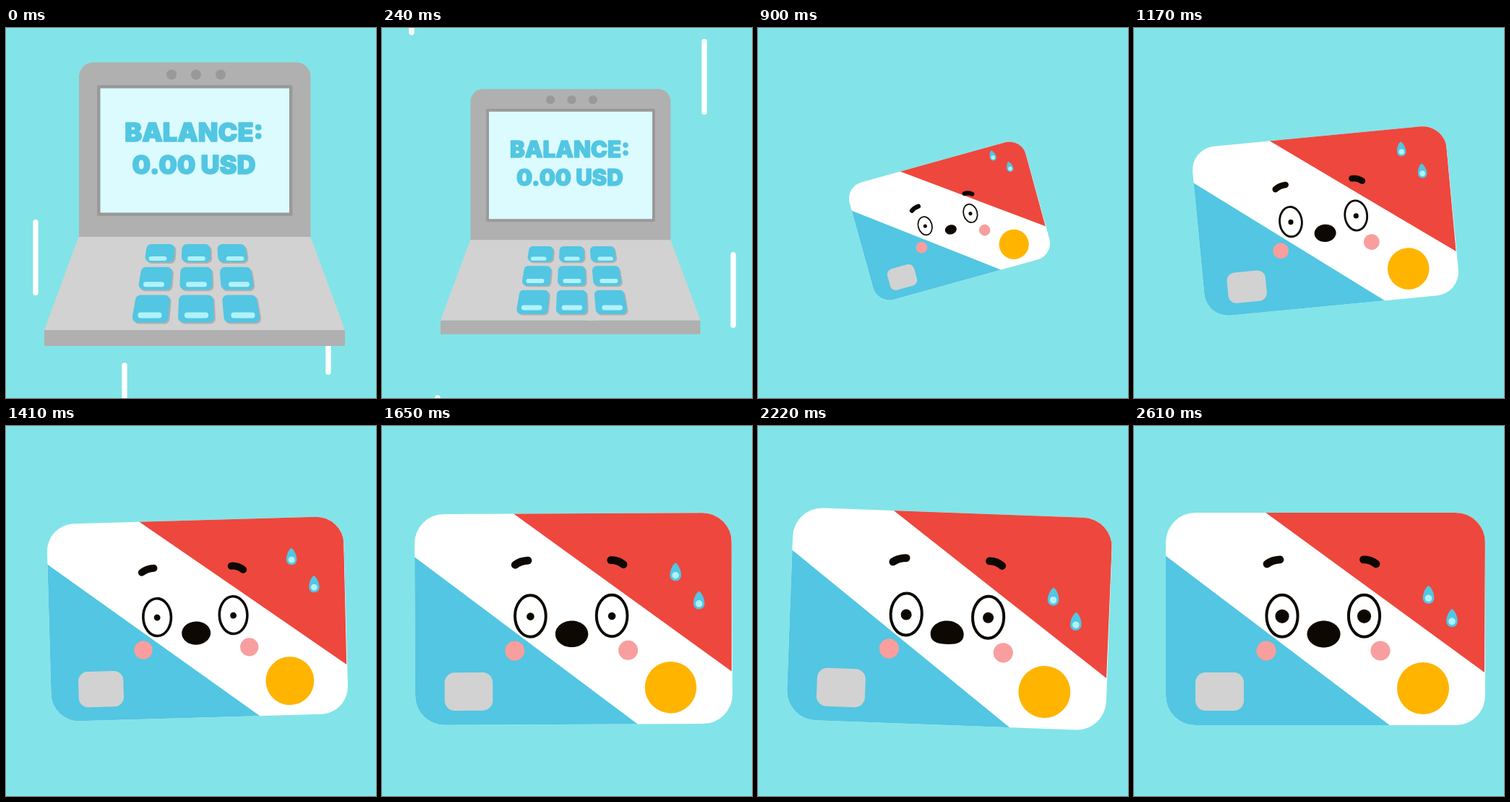
An HTML page with a canvas for the animation above (2640 ms loop, 512x512 px).

```html
<!DOCTYPE html>
<html lang="en">
<head>
<meta charset="utf-8">
<title>Empty balance</title>
<style>
  html, body { margin: 0; width: 100%; height: 100%; overflow: hidden; background: #82e4e8; }
  canvas { display: block; width: 512px; height: 512px; }
</style>
</head>
<body>
<canvas id="stage" width="512" height="512"></canvas>
<script>
const ctx = document.getElementById('stage').getContext('2d');
const LOOP = 2640, STEP = 30, SWAP = 780;
const SKY = '#82e4e8', BLUE = '#52c6e2', PALE = '#b0f2fc', RED = '#ee473e';
const GREY = '#b0b0b0', LIGHT = '#d2d2d2', DARK = '#999', INK = '#0d0802';

// Motion: every rule depends on the loop time in ms.
const laptopScale = t => 1 - 0.2715 * t / 480;
const distance = t => Math.pow(Math.max(0, 1760 - t) * 0.00076, 2);
const sway = t => t < 1770 || t > 2610 ? 0 : Math.sin(Math.PI * (t - 1770) / 840) ** 2;
const tilt = t => 2.15 * sway(t) - Math.pow(Math.max(0, 2081 - t) * 0.00168, 4);
const pupil = t => 4.5 + 5.1 * Math.pow(Math.max(0, t - 1170) / 1440, 1.65);
const slide = t => 1 - Math.exp(-Math.pow(Math.max(0, t - 792) * 0.0012, 2.3));

function fill(color) { ctx.fillStyle = color; ctx.fill(); }

function box(x, y, w, h, r, color) {
  ctx.beginPath();
  ctx.roundRect(x, y, w, h, r);
  fill(color);
}

function ellipse(x, y, rx, ry, color) {
  ctx.beginPath();
  ctx.ellipse(x, y, rx, ry, 0, 0, 7);
  fill(color);
}

const circle = (x, y, r, color) => ellipse(x, y, r, r, color);

function poly(points, color, r = 0) {
  const n = points.length, last = points[n - 1], first = points[0];
  ctx.beginPath();
  ctx.moveTo((last[0] + first[0]) / 2, (last[1] + first[1]) / 2);
  points.forEach((p, i) => ctx.arcTo(...p, ...points[(i + 1) % n], r));
  ctx.closePath();
  fill(color);
}

// x and starting top edge
const streaks = [
  [41, 265], [446, 375], [164, 463], [290, 670], [486, 670],
  [77, 868], [465, 1042], [77, 1143], [154, 1214]
];

function drawStreaks(t) {
  const span = 1320, length = 105;
  for (const [x, top] of streaks) {
    const y = (top - 1.5 * t + length + span) % span - length;
    box(x - 3.7, y, 7.4, length, 3.7, '#fff');
  }
}

// Keys widen and spread towards the viewer, row by row.
function drawKey(row, col) {
  const top = 299 + 28.25 * row + 3.5 * row * row;
  const bottom = top + 25 + 6.5 * row;
  const topX = 263 + col * (48.3 + 5.5 * row), topHalf = 19.4 + 2.1 * row;
  const bottomX = 263 + col * (51.3 + 6.5 * row), bottomHalf = 20.4 + 2.4 * row;
  const face = d => [
    [topX - topHalf + d, top + d], [topX + topHalf + d, top + d],
    [bottomX + bottomHalf + d, bottom + d], [bottomX - bottomHalf + d, bottom + d]
  ];
  poly(face(2), GREY, 7);
  poly(face(0), BLUE, 7);
  const w = 24.8 + 4.2 * row, h = 6 + row;
  const x = 263.5 + col * (53.5 + 5.5 * row);
  box(x - w / 2, bottom - 2 - 2 * row - h, w, h, 4, PALE);
}

function label(text, y) {
  ctx.strokeText(text, 260, y);
  ctx.fillText(text, 260, y);
}

function drawLaptop(t) {
  const s = laptopScale(t);
  ctx.save();
  ctx.translate(259.3, 320.3);
  ctx.scale(s, s);
  ctx.translate(-259.3, -320.3);
  box(101, 47.5, 320.5, 243.5, [20, 20, 0, 0], GREY);
  for (let i = -1; i <= 1; i++) circle(263 + 34 * i, 64.5, 7, DARK);
  box(126, 79, 270.5, 181, 2, DARK);
  box(130.5, 83.5, 261.5, 172, 0, '#dbfbff');
  poly([[100.5, 289], [421.5, 289], [469, 418], [53, 418]], LIGHT);
  box(53, 418, 416, 22, 0, GREY);
  for (let row = 0; row < 3; row++) {
    for (let col = -1; col <= 1; col++) drawKey(row, col);
  }
  ctx.font = '900 36px Inter, Roboto, sans-serif';
  ctx.textAlign = 'center';
  ctx.fillStyle = ctx.strokeStyle = BLUE;
  ctx.lineJoin = 'round';
  ctx.lineWidth = 1.5;
  label('BALANCE:', 156.5);
  label('0.00 USD', 201.5);
  ctx.restore();
}

function drawDrop(x, y) {
  ctx.save();
  ctx.translate(x, y);
  ctx.beginPath();
  ctx.moveTo(0, -13);
  ctx.bezierCurveTo(5, -10, 7.8, -1, 7.8, 4);
  ctx.bezierCurveTo(7.8, 15, -7.8, 15, -7.8, 4);
  ctx.bezierCurveTo(-7.8, -1, -5, -10, 0, -13);
  fill(BLUE);
  circle(0, 4.5, 4.8, PALE);
  ctx.restore();
}

function drawBrow(x0, y0, cx, cy, x1, y1) {
  ctx.beginPath();
  ctx.moveTo(x0, y0);
  ctx.quadraticCurveTo(cx, cy, x1, y1);
  ctx.strokeStyle = INK;
  ctx.lineWidth = 10.8;
  ctx.lineCap = 'round';
  ctx.stroke();
}

function drawMouth(size, flat) {
  const k = 0.552, rx = 23, ry = 18.5, low = ry - 4.5 * flat;
  const drop = ry * k + flat, reach = rx * (k + 0.04 * flat);
  ctx.save();
  ctx.translate(-2.5, 21);
  ctx.scale(size, size);
  ctx.beginPath();
  ctx.moveTo(-rx, 0);
  ctx.bezierCurveTo(-rx, -ry * k, -rx * k, -ry, 0, -ry);
  ctx.bezierCurveTo(rx * k, -ry, rx, -ry * k, rx, 0);
  ctx.bezierCurveTo(rx, drop, reach, low, 0, low);
  ctx.bezierCurveTo(-reach, low, -rx, drop, -rx, 0);
  fill(INK);
  ctx.restore();
}

function drawFace(t) {
  const far = distance(t), eye = 1 - 0.54 * far, brow = 65.6 * far - 79.6;
  for (const x of [-60, 53.5]) {
    ellipse(x, -4.3, 21.6 * eye, 29 * eye, '#fff');
    ctx.strokeStyle = INK;
    ctx.lineWidth = 4 * eye;
    ctx.stroke();
    circle(x, -3.7, pupil(t), INK);
  }
  for (const x of [-82, 76]) circle(x, 44, 13.6, '#f99e9e');
  drawBrow(-81, brow + 3.5, -74, brow - 2, -63, brow - 2.5);
  drawBrow(52.5, brow - 2.5, 62, brow - 3, 70, brow + 3.5);
  drawMouth(1 - 0.9 * far, sway(t));
}

function drawCard(t) {
  const s = 1 - distance(t);
  ctx.save();
  ctx.translate(265, 267);
  ctx.rotate(tilt(t) * Math.PI / 180);
  ctx.scale(s, s);
  ctx.save();
  ctx.beginPath();
  ctx.roundRect(-221, -147, 442, 294, 41);
  fill('#fff');
  ctx.clip();
  poly([[-84, -148], [221, -148], [220, 74]], RED);
  poly([[-222, -88], [90, 148], [-222, 148]], BLUE);
  ctx.restore();
  box(-180, 74, 67, 53, 14, LIGHT);
  circle(135, 96, 36, '#ffb400');
  drawFace(t);
  drawDrop(142.5, 92 * slide(t) - 125);
  drawDrop(175, 89 * slide(t + 80) - 90);
  ctx.restore();
}

function render(now) {
  const t = Math.floor(now % LOOP / STEP) * STEP;
  ctx.fillStyle = SKY;
  ctx.fillRect(0, 0, 512, 512);
  if (t < SWAP) {
    drawStreaks(t);
    drawLaptop(t);
  } else {
    drawCard(t);
  }
}

const start = performance.now();
function tick() {
  render(performance.now() - start);
  requestAnimationFrame(tick);
}
tick();
</script>
</body>
</html>
```
